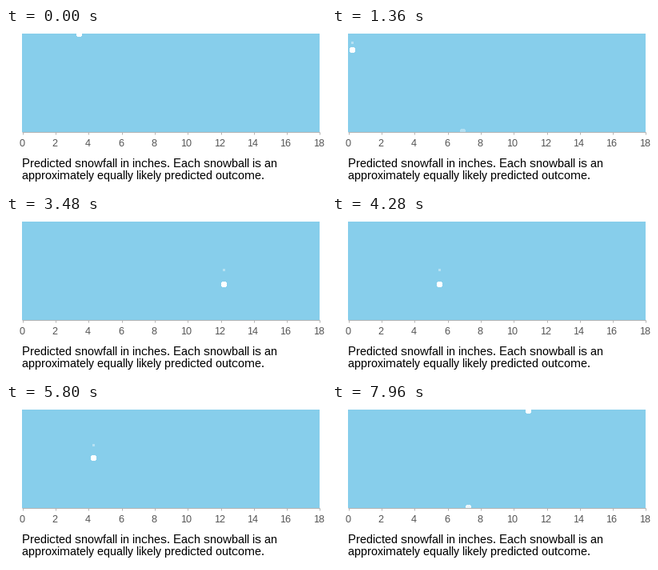
These frames come from a looping animation (400 by 200 pixels, 8 s). A matplotlib script:

```python
import math

import matplotlib.pyplot as plt
from matplotlib.animation import FuncAnimation
from matplotlib.patches import Circle, Rectangle

# fully hinted glyphs with whole-pixel advances
plt.rcParams.update({"text.hinting": "native", "text.hinting_factor": 1})

W, H, DPI = 400, 200, 100
FRAMES, INTERVAL = 200, 40
LEFT, RIGHT, TOP, BOTTOM = 20, 392, 7, 130
SKY_Y, GROUND_Y = TOP + 0.5, BOTTOM - 0.5
UNIT = (RIGHT - LEFT) / 18
FALL = 10          # frames from top to ground
SPACING = 9.9      # mean frames between snowballs
RADIUS = 3.5
SKY, GREY, LABEL = "#87CEEB", "#B3B3B3", "#4D4D4D"

# horizontal landing places in pixels
DROPS = [91.5, 140, 163.5, 25.5, 120, 110, 157.5, 69.5, 272.5, 330.5, 134.5,
         96.5, 116.5, 78.5, 109.5, 160, 184.3, 226.5, 123.5, 170.5, 245.5]
STARTS = [math.floor(SPACING * k + 0.35) for k in range(len(DROPS))]


def px(size):
    return size * 72 / DPI


def snap(value):
    return math.floor(value) + 0.5


fig = plt.figure(figsize=(W / DPI, H / DPI), dpi=DPI, facecolor="white")
ax = fig.add_axes([0, 0, 1, 1])
ax.set_xlim(0, W)
ax.set_ylim(H, 0)
ax.axis("off")

panel = Rectangle((LEFT, TOP), RIGHT - LEFT, BOTTOM - TOP, fc=SKY, lw=0)
ax.add_patch(panel)


def rule(xs, ys):
    ax.plot(xs, ys, color=GREY, lw=px(1), solid_capstyle="butt", zorder=2)


def write(x, y, text, size, color, align):
    ax.text(x, y, text, fontsize=px(size), color=color, ha=align,
            va="baseline", family="Liberation Sans")


rule([LEFT, RIGHT], [GROUND_Y, GROUND_Y])
for inch in range(0, 19, 2):
    x = LEFT + inch * UNIT
    tick = snap(min(x, RIGHT - 1))
    rule([tick, tick], [BOTTOM, BOTTOM + 3])
    write(x - 0.3, 148, str(inch), 12, LABEL, "center")

write(20, 174, "Predicted snowfall in inches. Each snowball is an",
      15, "black", "left")
write(20, 189, "approximately equally likely predicted outcome.",
      15, "black", "left")


def snowball(radius):
    dot = Circle((0, 0), radius, fc="white", lw=0, zorder=3,
                 antialiased=False)
    ax.add_patch(dot)
    dot.set_clip_path(panel)
    return dot


ball, landed, wake = snowball(RADIUS), snowball(RADIUS), snowball(0.8)


def place(dot, k, age):
    fall = min(max(age / FALL, 0), 1) ** 2
    y = SKY_Y + (GROUND_Y - SKY_Y) * fall
    dot.center = snap(DROPS[k]), snap(y)


def draw(frame):
    k = max(i for i, start in enumerate(STARTS) if start <= frame)
    age = frame - STARTS[k]
    place(ball, k, age)

    place(wake, k, age - 1)
    wake.set_alpha(0.4 if age else 0)

    place(landed, k - 1, FALL)
    landed.set_alpha(max(0, 1 - 0.16 * age) if k else 0)
    return ball, landed, wake


anim = FuncAnimation(fig, draw, frames=FRAMES, interval=INTERVAL,
                     init_func=lambda: draw(0), repeat=True, repeat_delay=0)
plt.show()
```
